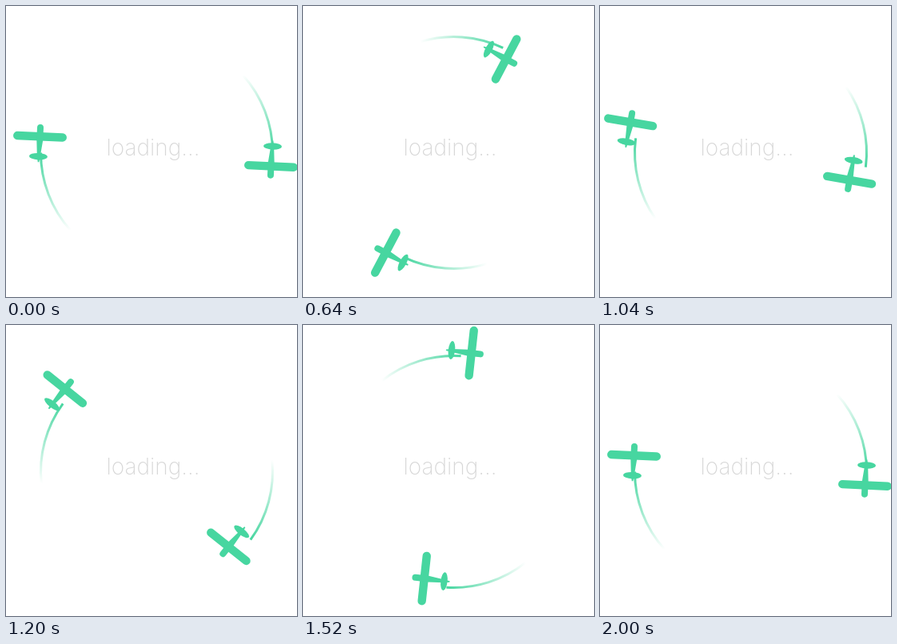
Recreate the animation shown at these times as an HTML page. Size 364 by 364 pixels, loop 2040 ms.

```html
<!DOCTYPE html>
<html lang="en">
<head>
<meta charset="utf-8">
<title>Loading</title>
<style>
  html, body { margin: 0; width: 100%; height: 100%; overflow: hidden; background: #fff; }
  svg { display: block; width: 100vw; height: 100vh; }
  text { font: 200 28px Inter, "Liberation Sans", sans-serif; fill: #d8d8d8; text-anchor: middle; }
</style>
</head>
<body>
<svg viewBox="0 0 364 364">
  <defs>
    <linearGradient id="fade" gradientUnits="userSpaceOnUse" x1="-145" y1="0" x2="-107.8" y2="97">
      <stop offset="0" stop-color="#47d6a0"/>
      <stop offset="1" stop-color="#47d6a0" stop-opacity="0"/>
    </linearGradient>
    <path id="trail" d="M-145 0A145 145 0 0 0 -107.8 97" fill="none" stroke="url(#fade)" stroke-width="3"/>
    <g id="plane" fill="#47d6a0">
      <rect x="-33.5" y="-5.2" width="67" height="10.4" rx="5.2"/>
      <path d="M-4 -11.3A4 4 0 0 1 4 -11.3V4L1.5 24L0.3 32H-1.3L-2.6 24L-4 4Z"/>
      <ellipse cx="-0.9" cy="25" rx="11.5" ry="4.2"/>
    </g>
  </defs>
  <text x="184" y="187">loading...</text>
  <use class="trail" href="#trail"/>
  <use class="trail" href="#trail"/>
  <use class="plane" href="#plane"/>
  <use class="plane" href="#plane"/>
</svg>
<script>
  const STEP = 40, LOOP = 2040, TURN = 2000;
  const TILT = 2.6; // wing angle at the start of a turn

  // Each plane circles its own, slightly shifted centre.
  const orbits = [
    { cx: 179, cy: 182, x: -136.5, y: -18.75 },
    { cx: 183.1, cy: 182.1, x: 148.4, y: 18.3 }
  ];
  const trails = document.querySelectorAll(".trail");
  const planes = document.querySelectorAll(".plane");

  function draw(time) {
    const angle = 360 * time / TURN;
    orbits.forEach(({ cx, cy, x, y }, i) => {
      const flip = 180 * i;
      trails[i].setAttribute("transform", `translate(188.5 183.5) rotate(${angle + flip})`);
      planes[i].setAttribute("transform",
        `translate(${cx} ${cy}) rotate(${angle}) translate(${x} ${y}) rotate(${TILT + flip})`);
    });
  }

  function tick() {
    const time = performance.now() % LOOP;
    draw(Math.floor(time / STEP) * STEP);
    requestAnimationFrame(tick);
  }
  tick();
</script>
</body>
</html>
```
